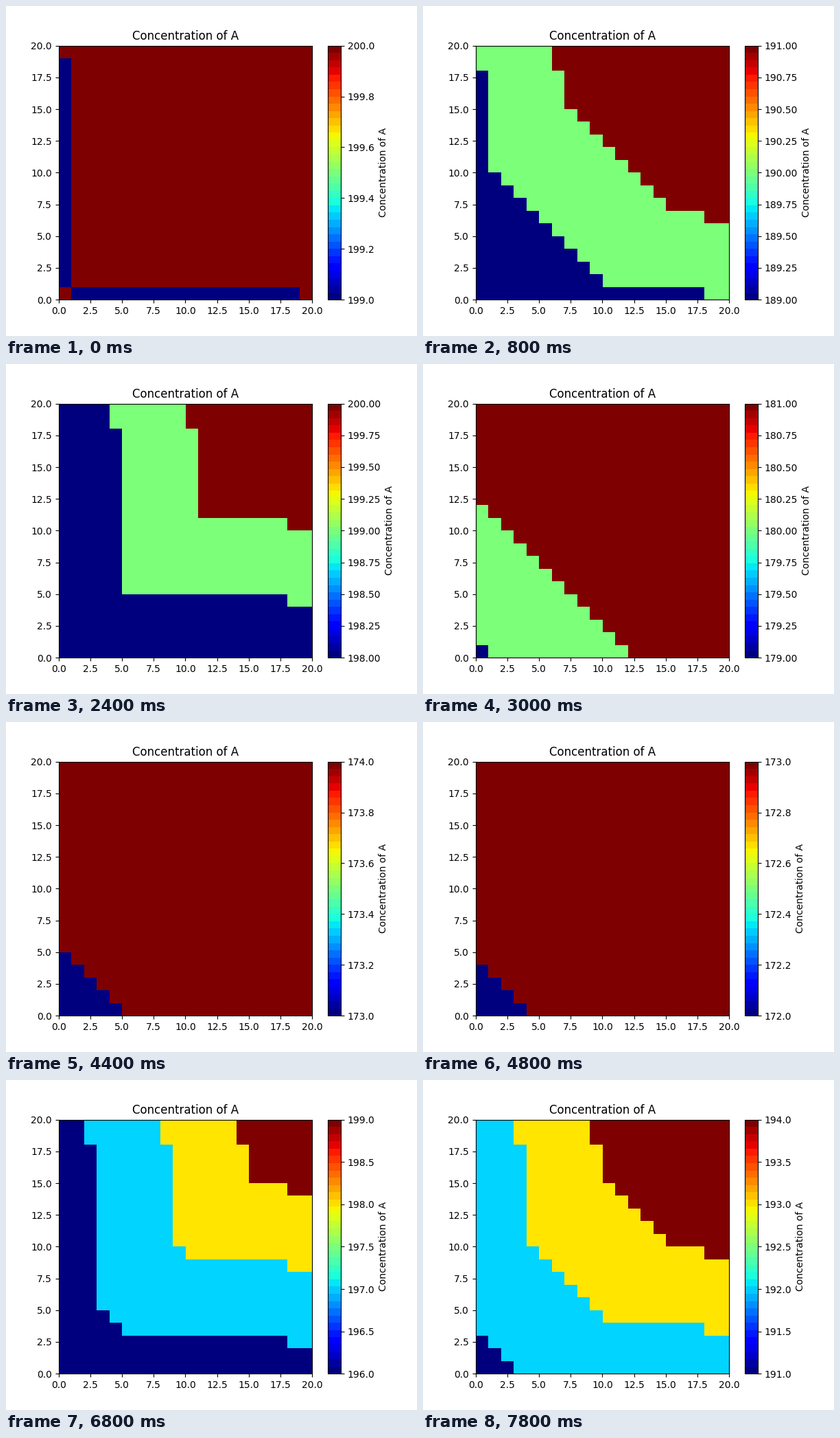
A matplotlib script for the animation above (8000 ms loop, 599x480 px).

```python
import numpy as np
import matplotlib.pyplot as plt
from matplotlib.animation import FuncAnimation
from matplotlib.cm import ScalarMappable
from matplotlib.colors import Normalize

W, H, DPI = 599, 480, 100
N, START, FRAMES = 20, 200, 40
LABEL = "Concentration of A"
JET = plt.get_cmap("jet")
BANDS = JET.resampled(35)

# Snapshots play in the alphabetical order of their numbers: 0, 1, 10, 11, ...
ORDER = sorted(range(FRAMES), key=str)

y, x = np.mgrid[:N, :N]


def side_front(k, near, along):
    """Loss carried inwards from one edge, one cell later by the far corner."""
    return (5 * k - near - (along >= N - 2)) // 6 + 1


def concentration(k):
    if k == 0:
        inner_x = (x > 0) & (x < N - 1)
        inner_y = (y > 0) & (y < N - 1)
        loss = ((x == 0) & inner_y) | ((y == 0) & inner_x)
        return START - loss.astype(int)
    sides = np.maximum(side_front(k, x, y), side_front(k, y, x))
    corner = (10 * k + 11 - x - y) // 11
    loss = np.maximum(np.maximum(sides, corner), max(0, k - 3))
    return START - loss


def limits(grid):
    lo, hi = grid.min(), grid.max()
    return (lo, hi) if lo < hi else (0.9 * lo, 1.1 * hi)


def draw(i):
    grid = concentration(ORDER[i])
    norm = Normalize(*limits(grid))
    fig.clear()
    ax = fig.add_subplot()
    ax.imshow(grid, cmap=JET, norm=norm, origin="lower",
              extent=(0, N, 0, N), interpolation="nearest")
    ticks = np.arange(0, N + 1, 2.5)
    ax.set_xticks(ticks)
    ax.set_yticks(ticks)
    ax.set_title(LABEL)
    fig.colorbar(ScalarMappable(norm, BANDS), ax=ax, label=LABEL)
    return []


fig = plt.figure(figsize=(W / DPI, H / DPI), dpi=DPI)
anim = FuncAnimation(fig, draw, frames=FRAMES, interval=200,
                     repeat=True, repeat_delay=0)
plt.show()
```
